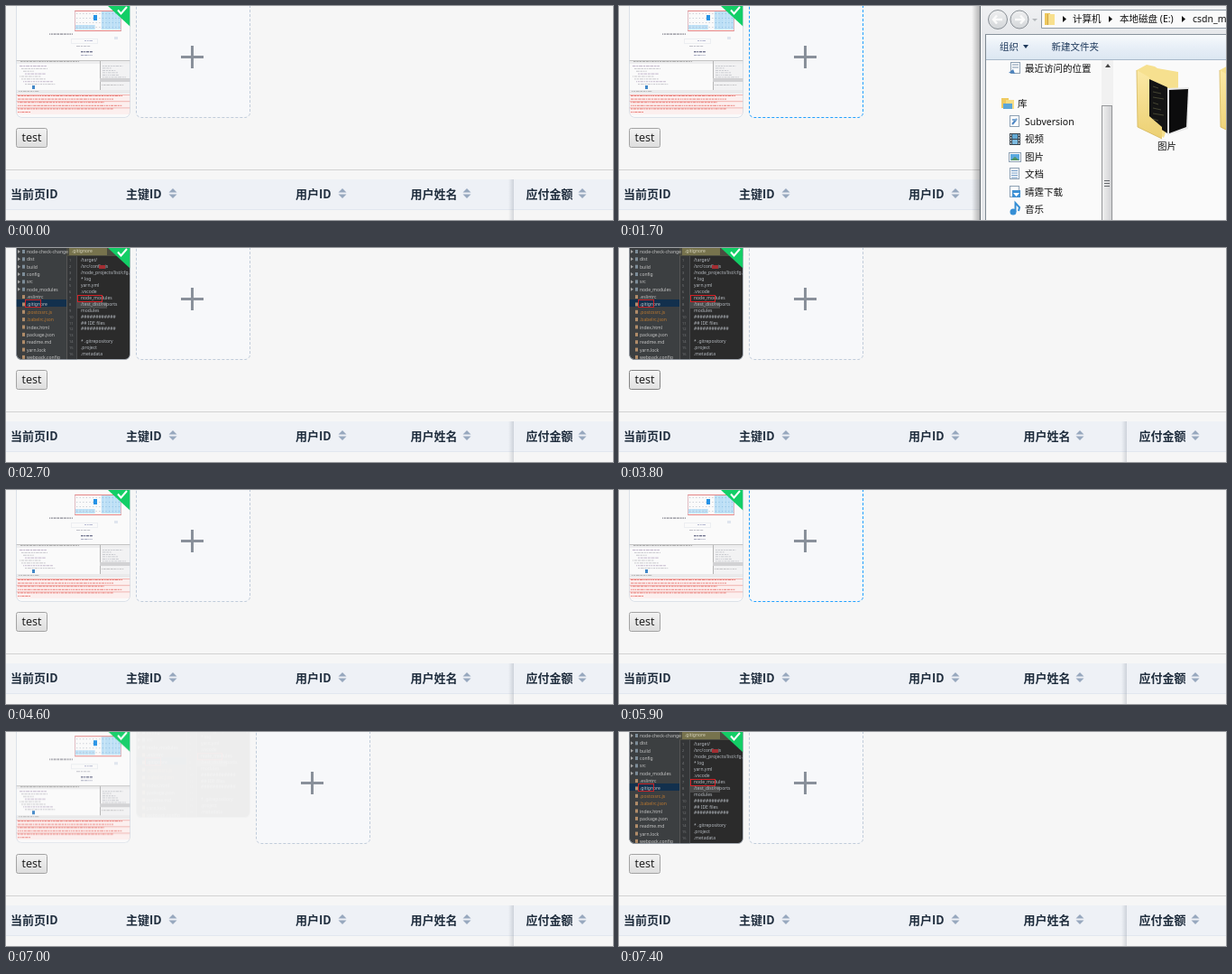
These frames come from a looping animation (673x237 px, 8000 ms). An HTML page with a canvas:

```html
<!DOCTYPE html>
<html lang="zh-CN">
<head>
<meta charset="utf-8">
<title>Upload list</title>
<style>
html, body { margin: 0; width: 100%; height: 100%; overflow: hidden; background: #f6f6f6; }
canvas { display: block; width: 673px; height: 237px; }
</style>
</head>
<body>
<canvas id="stage" width="673" height="237"></canvas>
<script>
const W = 673, H = 237, LOOP = 8000, STEP = 100;
const CARD_W = 127, CARD_H = 124, SLOT = 133, LEFT = 11;
const SANS = '"Noto Sans", "Noto Sans CJK SC", "Noto Sans CJK", sans-serif';
const CJK = '"Noto Sans CJK SC", "Noto Sans CJK", sans-serif';
const stage = document.getElementById('stage').getContext('2d');
let g = stage;

function rect(x, y, w, h, color) {
  g.fillStyle = color;
  g.fillRect(x, y, w, h);
}

function poly(color, ...p) {
  g.fillStyle = color;
  g.beginPath();
  for (let i = 0; i < p.length; i += 2) g.lineTo(p[i], p[i + 1]);
  g.closePath();
  g.fill();
}

function line(color, width, ...p) {
  g.strokeStyle = color;
  g.lineWidth = width;
  g.beginPath();
  for (let i = 0; i < p.length; i += 2) g.lineTo(p[i], p[i + 1]);
  g.stroke();
}

function frame(x, y, w, h, color, width = 1) {
  g.strokeStyle = color;
  g.lineWidth = width;
  g.strokeRect(x + 0.5, y + 0.5, w - 1, h - 1);
}

function text(str, x, y, font, color) {
  g.font = font;
  g.fillStyle = color;
  g.fillText(str, x, y);
}

function disc(x, y, r, fill, edge) {
  g.beginPath();
  g.arc(x, y, r, 0, 7);
  g.fillStyle = fill;
  g.fill();
  if (edge) {
    g.strokeStyle = edge;
    g.lineWidth = 1;
    g.stroke();
  }
}

function vertical(y0, y1, ...colors) {
  const grad = g.createLinearGradient(0, y0, 0, y1);
  colors.forEach((c, i) => grad.addColorStop(i / (colors.length - 1), c));
  return grad;
}

function horizontal(x0, x1, ...colors) {
  const grad = g.createLinearGradient(x0, 0, x1, 0);
  colors.forEach((c, i) => grad.addColorStop(i / (colors.length - 1), c));
  return grad;
}

function random(seed) {
  return () => (seed = (seed * 16807) % 2147483647) / 2147483647;
}

// A row of short strokes that reads as tiny text
function scribble(rnd, x, y, width, color, h = 0.8) {
  for (const end = x + width; x < end;) {
    const w = Math.min(1 + rnd() * 3, end - x);
    rect(x, y, w, h, color);
    x += w + 0.8;
  }
}

function bezier(x1, y1, x2, y2) {
  const at = (a, b, u) => 3 * a * u * (1 - u) ** 2 + 3 * b * u * u * (1 - u) + u ** 3;
  return x => {
    let lo = 0, hi = 1;
    for (let i = 0; i < 24; i++) {
      const mid = (lo + hi) / 2;
      if (at(x1, x2, mid) < x) lo = mid; else hi = mid;
    }
    return at(y1, y2, lo);
  };
}
const ease = bezier(0.55, 0, 0.1, 1);

// ---- thumbnails ----
function paintLight() {
  const rnd = random(71);
  rect(0, 0, CARD_W, CARD_H, '#fafafa');
  for (let r = 0; r < 4; r++) {
    for (let c = 0; c < 14; c++) {
      const x = 66 + c * 3.6, y = 6 + r * 5;
      if (c > 7 || r === 3 && c < 6) rect(x, y, 3.6, 5, '#bcdff6');
      rect(x + 1, y + 2, 1.2, 0.8, c > 7 ? '#8fbfe0' : '#b9c0ca');
    }
  }
  rect(86, 10, 4, 6, '#2492e6');
  line('#e58585', 1, 65, 5.5, 117, 5.5);
  line('#e58585', 1, 65, 27.5, 117, 27.5);
  line('#d5a0a8', 0.7, 65.5, 5, 65.5, 28);
  line('#d5a0a8', 0.7, 116.5, 5, 116.5, 28);
  scribble(rnd, 37, 30.5, 26, '#85858f', 1.2);
  scribble(rnd, 76, 38, 9, '#a2a6c6');
  frame(61, 36, 30, 6, '#eceef1');
  rect(109, 34, 4, 3, '#dfe5ee');
  scribble(rnd, 67, 44, 16, '#b4b5be');
  scribble(rnd, 72, 50, 13, '#71748f', 1.4);
  scribble(rnd, 72, 54, 13, '#9396b2');

  rect(0, 60, CARD_W, 4, '#ededee');
  scribble(rnd, 5, 61, 65, '#a2a2a2');
  line('#c4c4c4', 1, 0, 60.5, CARD_W, 60.5);
  for (let i = 0; i < 8; i++) {
    scribble(rnd, 4 + (i % 4) * 2, 66 + i * 2.9, 10 + rnd() * 24, i % 3 ? '#bbbbc0' : '#b3a4bf');
  }
  rect(93, 64, 34, 29, '#f2f2f3');
  line('#b5b5b5', 1, 93.5, 61, 93.5, 93);
  for (let i = 0; i < 6; i++) scribble(rnd, 96, 66 + i * 2.5, 9 + rnd() * 18, '#c0c2c8');
  rect(93, 80, 34, 4, '#d2d2d4');
  scribble(rnd, 95, 87, 25, '#b8b8bb');
  rect(18, 88, 3, 4, '#4388c8');
  rect(0, 93, CARD_W, 4, '#eaeaeb');
  scribble(rnd, 3, 94, 23, '#aaa');
  rect(0, 98, CARD_W, 22, '#fcefee');
  for (let i = 0; i < 6; i++) {
    const y = 99 + i * 3.6;
    if (i % 2 === 0) line('#eb9a96', 0.7, 0, y - 0.5, CARD_W, y - 0.5);
    scribble(rnd, 2, y, i === 5 ? 14 : 116 - (i % 3) * 10, '#ea7e79', 1);
  }
  rect(0, 120, CARD_W, 4, '#fafafa');
}

function paintDark() {
  rect(0, 0, CARD_W, CARD_H, '#2b2b2b');
  rect(0, 0, 56, CARD_H, '#3c3f41');
  rect(56, 0, 71, 9, '#4b4b40');
  rect(59, 0, 42, 8, '#77734d');
  rect(57, 9, 10, CARD_H, '#343638');
  line('#555', 1, 56.5, 9, 56.5, CARD_H);
  line('#4a4c4e', 1, 67.5, 9, 67.5, CARD_H);
  rect(0, 57, 56, 8, '#12304d');

  const tree = ['node-check-change', 'dist', 'build', 'config', 'src', 'node_modules', '.eslintrc',
    '.gitignore', '.postcssrc.js', '.babelrc.json', 'index.html', 'package.json', 'readme.md', 'yarn.lock', 'webpack.config'];
  tree.forEach((name, i) => {
    const y = 5 + i * 8.35;
    const warm = i === 8 || i === 9;
    rect(7, y - 3, 3, 4, i < 6 ? '#7d8d99' : '#b08c69');
    if (i < 6) poly('#a5a5a5', 2, y - 3, 5, y - 1, 2, y + 1);
    text(name, 12, y + 1, '5px ' + SANS, warm ? '#ba7830' : '#c4c4c4');
  });
  frame(10, 57, 18, 9, '#c82329');

  text('.gitignore', 62, 5, '5px ' + SANS, '#d6d3bd');
  const rows = ['/target/', '/src/config.js', '/node_projects/list/cfg.js', '* log', 'yarn.yml', '.vscode',
    'node_modules', '/test_dist/reports', 'modules', '############', '## IDE files', '############', '',
    '* .gitrepository', '.project', '.metadata'];
  rect(68, 60, 33, 7, '#4a4a4a');
  rows.forEach((row, i) => {
    text(row, 72, 15 + i * 6.95, '5px ' + SANS, '#b5bac0');
    text(String(i + 1), 59, 15 + i * 6.95, '4px ' + SANS, '#77797b');
  });
  rect(92, 19, 7, 4, '#a32d32');
  frame(68, 52, 28, 8, '#d42127');
}

function cardOutline(x) {
  g.beginPath();
  g.roundRect(x + 0.5, -8, CARD_W - 1, CARD_H + 7.5, 5.5);
}

function makeCard(paint) {
  const layer = document.createElement('canvas');
  layer.width = CARD_W;
  layer.height = CARD_H;
  g = layer.getContext('2d');
  cardOutline(0);
  g.clip();
  paint();
  poly('#13ce66', 102, 0, 127, 0, 127, 23);
  line('#fff', 2, 113, 4.5, 116.5, 8.5, 123, 1);
  g.strokeStyle = '#c0ccda';
  g.lineWidth = 1;
  cardOutline(0);
  g.stroke();
  g = stage;
  return layer;
}
const cards = { light: makeCard(paintLight), dark: makeCard(paintDark) };

function drawCard(kind, slot, dy, alpha) {
  g.globalAlpha = alpha;
  g.drawImage(cards[kind], LEFT + slot * SLOT, dy);
  g.globalAlpha = 1;
}

// ---- page ----
function drawPicker(slot, hover) {
  const x = LEFT + slot * SLOT;
  cardOutline(x);
  g.fillStyle = '#f7f8fa';
  g.fill();
  g.strokeStyle = hover ? '#20a0ff' : '#c0ccda';
  g.lineWidth = 1;
  g.setLineDash([3, 2]);
  g.stroke();
  g.setLineDash([]);
  rect(x + 50, 55, 25, 3, '#89909a');
  rect(x + 61, 44, 3, 25, '#89909a');
}

const BUTTON = {
  normal: ['#f3f3f3', '#dddddd', '#a3a3a3'],
  hover: ['#f6f6f6', '#e0e0e0', '#858585'],
  active: ['#dcdcdc', '#ededed', '#858585']
};

function drawButton(mode) {
  const [top, bottom, edge] = BUTTON[mode];
  g.beginPath();
  g.roundRect(11.5, 135.5, 34, 21, 2);
  g.fillStyle = vertical(135, 157, top, bottom);
  g.fill();
  g.strokeStyle = edge;
  g.lineWidth = 1;
  g.stroke();
  text('test', 17.5, 150, '12.6px "Open Sans", "Noto Sans", sans-serif', '#161616');
}

function sorter(x) {
  poly('#97a8be', x - 4.5, 206.5, x, 202, x + 4.5, 206.5);
  poly('#97a8be', x - 4.5, 208.5, x, 213, x + 4.5, 208.5);
}

function drawTable() {
  rect(0, 181, W, 1, '#d2d2d2');
  rect(0, 192, W, 33, '#eef1f6');
  rect(0, 225, W, 1, '#e2e7ef');
  rect(557, 192, 6, 45, horizontal(557, 563, 'rgba(120,130,145,0)', 'rgba(120,130,145,.28)'));
  const heads = [['当前页ID', 5], ['主键ID', 133, 185], ['用户ID', 321, 373], ['用户姓名', 448.5, 511], ['应付金额', 576.5, 639]];
  for (const [label, x, arrow] of heads) {
    text(label, x, 212.5, 'bold 13px ' + CJK, '#1f2d3d');
    if (arrow) sorter(arrow);
  }
}

// ---- file dialog ----
function label(str, x, y, color = '#111') {
  text(str, x, y, '10.5px ' + SANS, color);
}

function page(x, y) {
  rect(x, y, 11, 13, '#fdfdfd');
  frame(x, y, 11, 13, '#8da0b3');
}

const icons = {
  recent(y) {
    page(434, y - 7);
    line('#7b93ad', 1, 436, y - 4, 443, y - 4);
    line('#7b93ad', 1, 436, y - 1, 443, y - 1);
    poly('#4c83bd', 432, y + 5, 437, y + 1, 439, y + 6);
  },
  library(y) {
    rect(424, y - 6, 8, 11, '#efca60');
    rect(429, y - 4, 9, 10, '#f6dd87');
    rect(426, y, 10, 6, '#5ca6d8');
  },
  repo(y) {
    page(433, y - 7);
    line('#4d86c4', 2, 436, y + 3, 441, y - 3);
    rect(436, y - 3, 5, 2, '#7ba8d4');
  },
  video(y) {
    rect(433, y - 6, 12, 13, '#39454f');
    rect(436, y - 5, 6, 5, '#64a9d3');
    rect(436, y + 1, 6, 5, '#7dbadf');
    for (let i = 0; i < 4; i++) {
      rect(434, y - 5 + i * 3, 1, 2, '#d7dde2');
      rect(443, y - 5 + i * 3, 1, 2, '#d7dde2');
    }
  },
  picture(y) {
    rect(432, y - 5, 14, 11, '#fdfdfd');
    frame(432, y - 5, 14, 11, '#8da0b3');
    rect(434, y - 3, 10, 7, '#5aa9e0');
    poly('#4d9364', 434, y + 4, 439, y, 444, y + 4);
  },
  doc(y) {
    page(433, y - 7);
    for (let i = 0; i < 4; i++) line('#719bc7', 1, 435, y - 3.5 + i * 2.5, 442, y - 3.5 + i * 2.5);
  },
  download(y) {
    page(433, y - 7);
    rect(436, y - 2, 9, 8, '#3f91d4');
    poly('#fff', 437, y + 1, 444, y + 1, 440.5, y + 5);
  },
  music(y) {
    disc(437, y + 3, 3.5, '#368fd5');
    line('#368fd5', 2, 439.5, y + 3, 439.5, y - 7, 444, y - 2, 443, y + 2);
  }
};

const places = [['recent', '最近访问的位置', 69], ['library', '库', 108], ['repo', 'Subversion', 128], ['video', '视频', 147],
  ['picture', '图片', 167], ['doc', '文档', 186], ['download', '晴霆下载', 206], ['music', '音乐', 225]];

function folder(x) {
  g.save();
  g.translate(x, 0);
  poly('#f6e08f', 0, 71, 11, 65, 20, 67, 23, 69, 46, 73, 46, 100, 30, 146, 10, 130);
  poly('#141414', 14, 81, 34, 90, 34, 141, 14, 128);
  poly('#e9e9e9', 34, 91, 58, 90, 57, 136, 34, 143);
  poly('#0c0c0d', 36, 93, 57, 92, 55, 134, 36, 141);
  for (let i = 0; i < 7; i++) line('#5a5940', 0.7, 18, 89 + i * 6, 24 + (i % 3) * 3, 91 + i * 6);
  poly(vertical(70, 147, '#fbe9a6', '#ecd073'), 0, 71, 14, 79, 14, 122, 28, 134, 28, 147, 1, 134);
  line('#d5b65b', 0.8, 0, 71, 1, 134, 28, 147);
  g.restore();
}

function drawDialog(alpha) {
  if (!alpha) return;
  g.globalAlpha = alpha;
  rect(391, 0, 9, H, horizontal(391, 400, 'rgba(0,0,0,0)', 'rgba(0,0,0,.28)'));
  rect(400, 0, W - 400, H, vertical(0, 31, '#f0f1f3', '#e6e8eb'));
  rect(400, 0, 1, H, '#60686f');
  rect(401, 0, 1, H, '#f8f9fa');

  for (const [x, r] of [[420, 10.5], [444, 10]]) {
    disc(x, 15, r, vertical(5, 25, '#eff0f1', '#d3d6d9'), '#8a9096');
    const s = x < 430 ? -1 : 1;
    line('#fbfbfb', 2.5, x - 5, 15, x + 5, 15);
    line('#fbfbfb', 2.5, x + s, 10.5, x + s * 5, 15, x + s, 19.5);
  }
  poly('#b4b8bc', 458, 14, 464, 14, 461, 17);
  rect(468, 4, W - 468, 21, '#fafafa');
  line('#8e99a4', 1, W, 4.5, 468.5, 4.5, 468.5, 24.5, W, 24.5);
  rect(472, 8, 6, 13, '#edc75c');
  rect(475, 9, 8, 12, '#f8e08e');
  line('#cda54b', 1, 475.5, 9, 475.5, 21);
  for (const x of [492, 543, 624]) poly('#111', x, 11, x + 4, 14.5, x, 18);
  label('计算机', 503, 18);
  label('本地磁盘 (E:)', 555, 18);
  label('csdn_m', 636, 18);

  rect(406, 31, W - 406, H, '#fafafa');
  rect(406, 31, W - 406, 28, vertical(31, 59, '#f8fbfd', '#e8eff7', '#dce7f2'));
  rect(406, 31, 1, H, '#7d8891');
  rect(406, 31, W - 406, 1, '#87929c');
  rect(407, 59, W - 407, 1, '#a9b9ca');
  label('组织', 422, 49, '#1e395b');
  poly('#1e395b', 448, 43, 454, 43, 451, 47);
  label('新建文件夹', 479.5, 49, '#1e395b');

  for (const [icon, name, y] of places) {
    icons[icon](y);
    label(name, icon === 'library' ? 442 : 450, y + 3.5);
  }

  rect(535, 60, 13, H, '#f1f1f1');
  poly('#444', 539, 68, 542, 64, 545, 68);
  rect(535, 110, 12, H, horizontal(535, 547, '#f2f2f2', '#cfd0d2'));
  frame(535, 110, 12, H, '#949699');
  for (let i = 0; i < 3; i++) line('#65686c', 1, 538, 193.5 + i * 3, 544, 193.5 + i * 3);

  folder(574);
  folder(666);
  label('图片', 597, 159);
  g.globalAlpha = 1;
}

// ---- timeline ----
const swaps = [[2120, 2700, 'dark'], [3820, 4400, 'light'], [6920, 7400, 'dark']];
const within = (t, a, b) => t >= a && t < b;

function dialogAlpha(t) {
  if (within(t, 1500, 2200)) return Math.min(1, 0.35 + (t - 1500) / 250);
  if (within(t, 2200, 2300)) return 0.35;
  if (within(t, 6200, 6800)) return Math.min(1, 0.35 + (t - 6200) / 250);
  return 0;
}

function buttonMode(t) {
  if (within(t, 3500, 3600)) return 'active';
  return within(t, 3400, 4600) ? 'hover' : 'normal';
}

function render(t) {
  rect(0, 0, W, H, '#f6f6f6');
  let current = 'light', swap = null;
  for (const [start, end, kind] of swaps) {
    if (t >= end) current = kind;
    else if (t >= start) swap = { p: ease(Math.min(1, (t - start) / 500)), kind };
  }
  const hover = within(t, 1300, 2300) || within(t, 5900, 7000);
  drawPicker(swap ? 2 : 1, hover);
  if (swap) {
    drawCard(current, 0, -20 * swap.p, 1 - swap.p);
    drawCard(swap.kind, 1, -30 * (1 - swap.p), swap.p);
  } else {
    drawCard(current, 0, 0, 1);
  }
  drawButton(buttonMode(t));
  drawTable();
  drawDialog(dialogAlpha(t));
}

const begin = performance.now();
function tick() {
  const t = (performance.now() - begin) % LOOP;
  render(Math.floor(t / STEP) * STEP);
  requestAnimationFrame(tick);
}
tick();
</script>
</body>
</html>
```
